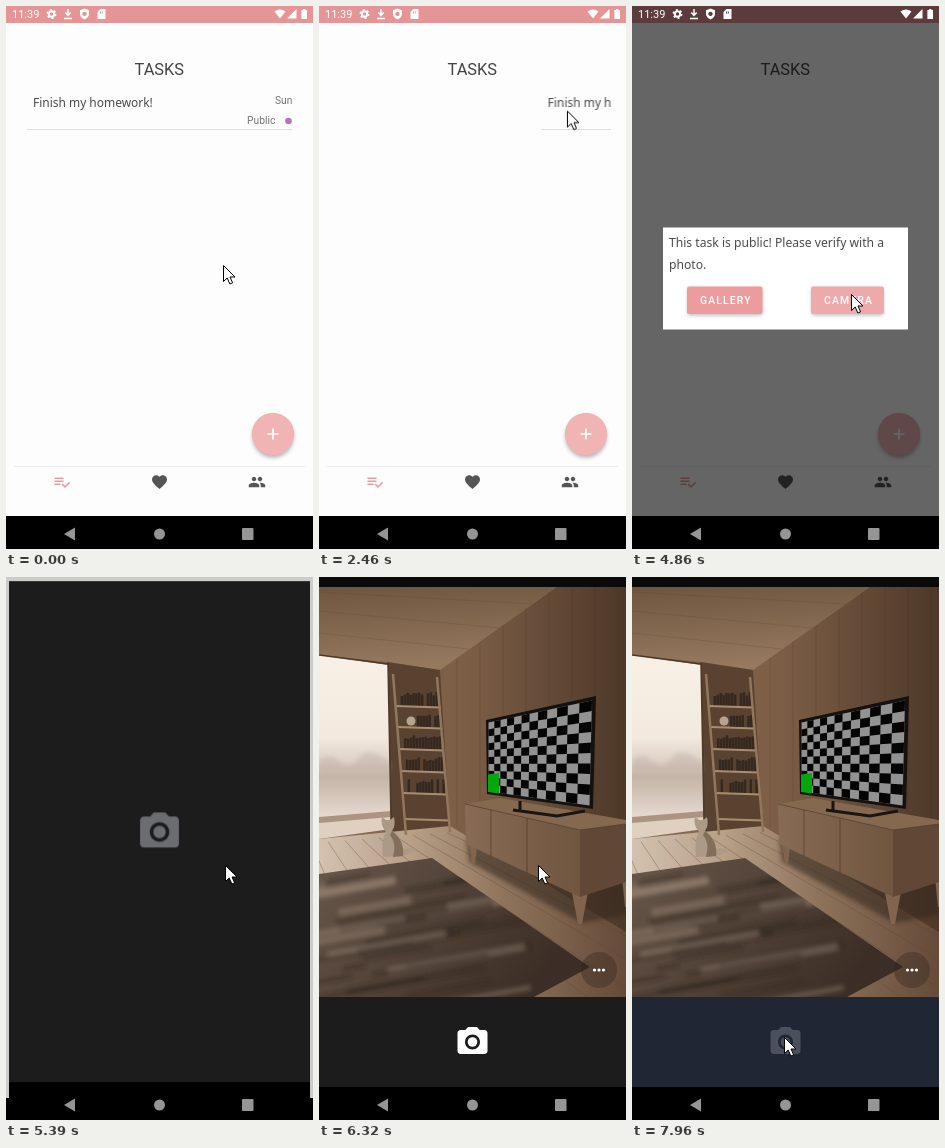
An HTML page that plays this animation: 307x543 px, repeating every 8 s.

```html
<!DOCTYPE html>
<html lang="en">
<head>
<meta charset="utf-8">
<title>Task verification</title>
<style>
html, body { margin: 0; width: 100%; height: 100%; overflow: hidden; background: #000; }
svg { display: block; width: 307px; height: 543px; }
text { font-family: Roboto, sans-serif; }
.note { font-family: "Noto Sans", sans-serif; fill: #4a4a4a; }
.btn { font-size: 10.4px; font-weight: 500; letter-spacing: 1.15px; fill: #fff; }
.anim { animation: 8s linear infinite; }

#cursor { animation-name: cursor; }
@keyframes cursor {
  0%, 5% { transform: translate(217px, 259px); }
  9% { transform: translate(92px, 150px); }
  12% { transform: translate(22px, 98px); }
  14.75%, 15.3% { transform: translate(70px, 90px); animation-timing-function: ease-in-out; }
  19.5% { transform: translate(177px, 82px); }
  21.5% { transform: translate(170px, 112px); }
  23.5%, 24.6% { transform: translate(140px, 98px); }
  25.375%, 26.4% { transform: translate(154px, 98px); }
  30% { transform: translate(255px, 104px); animation-timing-function: ease-in-out; }
  34.2%, 46.4% { transform: translate(149px, 113px); }
  49.75%, 51.2% { transform: translate(212px, 263px); }
  53.875%, 86.6% { transform: translate(219px, 288px); animation-timing-function: ease-in-out; }
  95%, 100% { transform: translate(152px, 460px); }
}
#row { animation-name: row; }
@keyframes row {
  0%, 24.8% { transform: none; }
  25.375%, 26.4% { transform: translateX(11px); }
  30% { transform: translateX(112px); }
  31.6%, 100% { transform: translateX(300px); }
}
#dim { animation-name: dim; }
@keyframes dim { 0%, 31.2% { opacity: 0; } 34.2%, 100% { opacity: .6; } }
#dialog { animation-name: dialog; transform-origin: 153.5px 272.5px; }
@keyframes dialog {
  0%, 31.4% { opacity: 0; transform: scale(.92); }
  34.2%, 100% { opacity: 1; transform: none; }
}
#press { animation-name: press; }
@keyframes press { 0%, 57.5% { opacity: 0; } 60.6%, 100% { opacity: .15; } }
#status { animation-name: status; }
@keyframes status { 0%, 62.99% { opacity: 1; } 63%, 100% { opacity: 0; } }
#backdrop { animation-name: backdrop; }
@keyframes backdrop { 0%, 64.2% { opacity: 0; } 64.875%, 100% { opacity: 1; } }
#camera { animation-name: camera; transform-origin: 153.5px 235px; }
@keyframes camera {
  0%, 64.5% { opacity: 0; transform: scale(.88); }
  65.9% { opacity: 1; transform: scale(.94); }
  67.375% { opacity: 1; transform: scale(.98, .982); }
  68.125%, 100% { opacity: 1; transform: none; }
}
#splash { animation-name: splash; }
@keyframes splash { 0%, 76% { opacity: 1; } 77.5%, 100% { opacity: 0; } }
#preview { animation-name: preview; }
@keyframes preview { 0%, 76% { opacity: 0; } 78%, 100% { opacity: 1; } }
#panel { animation-name: panel; }
@keyframes panel { 0%, 95.6% { fill: #1c1c1c; } 98.5%, 100% { fill: #1f2734; } }
#shutter { animation-name: shutter; }
@keyframes shutter { 0%, 95.6% { fill: #fff; } 98%, 100% { fill: #4a515d; } }
</style>
</head>
<body>
<svg viewBox="0 0 307 543">
  <defs>
    <clipPath id="listClip"><rect x="15" y="78" width="277" height="50"/></clipPath>
    <clipPath id="rugClip"><path d="M0 297L113 281 271 390 215 420H0Z"/></clipPath>
    <clipPath id="viewClip"><rect y="10" width="307" height="410"/></clipPath>
    <filter id="soft" x="-30%" y="-30%" width="160%" height="170%"><feGaussianBlur stdDeviation="2"/></filter>
    <linearGradient id="sky" x2="0" y2="1">
      <stop stop-color="#f8f0e6"/><stop offset=".48" stop-color="#f3e9df"/>
      <stop offset=".62" stop-color="#ddcfc4"/><stop offset=".7" stop-color="#c5b4a8"/>
      <stop offset=".78" stop-color="#d0c0b4"/><stop offset="1" stop-color="#efe4da"/>
    </linearGradient>
    <linearGradient id="wall"><stop stop-color="#8c6e55"/><stop offset=".5" stop-color="#7b5d45"/><stop offset="1" stop-color="#4d3829"/></linearGradient>
    <linearGradient id="ceiling" x2=".2" y2="1"><stop stop-color="#6f553f"/><stop offset="1" stop-color="#967a60"/></linearGradient>
    <linearGradient id="floor"><stop stop-color="#d3c2b0"/><stop offset=".3" stop-color="#b79f88"/><stop offset=".6" stop-color="#8f745c"/><stop offset="1" stop-color="#654b38"/></linearGradient>
    <linearGradient id="rug" x2="1" y2=".4"><stop stop-color="#68574a"/><stop offset="1" stop-color="#3c2e26"/></linearGradient>
    <linearGradient id="front"><stop stop-color="#886b54"/><stop offset="1" stop-color="#70553f"/></linearGradient>
    <g id="cam">
      <path fill-rule="evenodd" d="M9 2L7.17 4H4c-1.1 0-2 .9-2 2v12c0 1.1.9 2 2 2h16c1.1 0 2-.9 2-2V6c0-1.1-.9-2-2-2h-3.17L15 2H9zm3 15c-2.76 0-5-2.24-5-5s2.24-5 5-5 5 2.24 5 5-2.24 5-5 5z"/>
      <circle cx="12" cy="12" r="3.2"/>
    </g>
  </defs>

  <rect width="307" height="510" fill="#fdfdfd"/>
  <rect width="307" height="17" fill="#e69596"/>

  <text x="128.5" y="69" font-size="16.4" fill="#444">TASKS</text>
  <g clip-path="url(#listClip)">
    <g id="row" class="anim">
      <text class="note" x="27" y="101" font-size="11.96">Finish my homework!</text>
      <g font-size="10.3" fill="#777">
        <text x="269" y="98">Sun</text>
        <text x="241" y="118">Public</text>
      </g>
      <circle cx="282.5" cy="115" r="3.3" fill="#b673bd"/>
      <path d="M21 123.5H286" stroke="#ddd"/>
    </g>
  </g>
  <circle cx="267" cy="431" r="20.5" fill="#000" opacity=".3" filter="url(#soft)"/>
  <circle cx="267" cy="428" r="21.2" fill="#f0b4b4"/>
  <path d="M261.5 428h11M267 422.5v11" stroke="#fff" stroke-width="1.7"/>
  <path d="M8 460.5H299" stroke="#eee"/>
  <g fill="#555">
    <path fill="#ef9a9a" transform="translate(47 467) scale(.75)" d="M14 10H2v2h12v-2zm0-4H2v2h12V6zM2 16h8v-2H2v2zm19.5-4.5L23 13l-6.99 7-4.51-4.5L13 14l3.01 3 5.49-5.5z"/>
    <path transform="translate(144.5 467) scale(.75)" d="M12 21.35l-1.45-1.32C5.4 15.36 2 12.28 2 8.5 2 5.42 4.42 3 7.5 3c1.74 0 3.41.81 4.5 2.09C13.09 3.81 14.76 3 16.5 3 19.58 3 22 5.42 22 8.5c0 3.78-3.4 6.86-8.55 11.54L12 21.35z"/>
    <path transform="translate(242 467) scale(.75)" d="M16 11c1.66 0 2.99-1.34 2.99-3S17.66 5 16 5s-3 1.34-3 3 1.34 3 3 3zm-8 0c1.66 0 2.99-1.34 2.99-3S9.66 5 8 5 5 6.34 5 8s1.34 3 3 3zm0 2c-2.33 0-7 1.17-7 3.5V19h14v-2.5c0-2.33-4.67-3.5-7-3.5zm8 0c-.29 0-.62.02-.97.05 1.16.84 1.97 1.97 1.97 3.45V19h6v-2.5c0-2.33-4.67-3.5-7-3.5z"/>
  </g>
  <rect y="510" width="307" height="33"/>
  <rect id="dim" class="anim" width="307" height="510"/>

  <g id="status" class="anim" fill="#fff">
    <text x="6" y="12" font-size="11">11:39</text>
    <g fill="none" stroke="#fff">
      <circle cx="45.5" cy="8" r="2.7" stroke-width="2"/>
      <circle cx="45.5" cy="8" r="4.2" stroke-width="1.5" stroke-dasharray="2 2.4"/>
      <path d="M62 3v6M59.3 6.5L62 9.3 64.7 6.5M58 12.5h8" stroke-width="1.5"/>
    </g>
    <path fill-rule="evenodd" d="M78.5 2.5l4.5 1.7v3.5c0 2.8-2 4.8-4.5 5.8-2.5-1-4.5-3-4.5-5.8V4.2ZM78.5 5.7a2.2 2.2 0 1 0 .01 0Z"/>
    <path fill-rule="evenodd" d="M94.5 3H99.5V13H91.5V6ZM94 5.5v2h1v-2zm1.8 0v2h1v-2z"/>
    <path d="M268.5 5.5Q274 1.5 279.5 5.5L274 12.5Z"/>
    <path d="M281 12.5L290.5 3V12.5Z"/>
    <path d="M297 3h2.4v1H301v9h-5.6V4H297Z"/>
  </g>

  <g id="dialog" class="anim">
    <rect x="31" y="221.5" width="245" height="102" fill="#fff"/>
    <g font-size="12.13">
      <text class="note" x="37" y="241">This task is public! Please verify with a</text>
      <text class="note" x="37" y="262.5">photo.</text>
    </g>
    <g fill="#000" opacity=".3" filter="url(#soft)">
      <rect x="56" y="283" width="74" height="26"/><rect x="180" y="283" width="71" height="26"/>
    </g>
    <g fill="#ec9c9d">
      <rect x="55" y="280.5" width="75.5" height="27.5" rx="2"/>
      <rect x="179" y="280.5" width="73" height="27.5" rx="2"/>
    </g>
    <rect id="press" class="anim" x="179" y="280.5" width="73" height="27.5" rx="2" fill="#fff"/>
    <text class="btn" x="68" y="298">GALLERY</text>
    <text class="btn" x="192" y="298">CAMERA</text>
  </g>

  <rect id="backdrop" class="anim" width="307" height="521" fill="#cbcdca"/>
  <g id="camera" class="anim">
    <rect width="307" height="543"/>
    <rect width="307" height="510" fill="#1c1c1c"/>
    <g id="splash" class="anim" fill="#6c6d70">
      <use href="#cam" transform="translate(129.7 231.5) scale(1.985)"/>
    </g>
    <g id="preview" class="anim">
      <rect width="307" height="10" fill="#0a0a0a"/>
      <g clip-path="url(#viewClip)">
        <rect y="10" width="307" height="410" fill="url(#wall)"/>
        <path id="planks" fill="none" stroke="#3d2b1f" stroke-opacity=".22" stroke-width=".8"/>
        <path d="M0 10H238L121 93 70 85 0 77Z" fill="url(#ceiling)"/>
        <path d="M0 34L180 51M0 56L150 72M0 15L215 27" stroke="#5b4532" stroke-opacity=".25"/>
        <path d="M68 85L121 93 131 252 68 264Z" fill="#59422f"/>
        <path d="M0 262L131 249 307 355V420H0Z" fill="url(#floor)"/>
        <path id="boards" stroke="#5d4735" stroke-opacity=".35"/>
        <path d="M0 78L69 88 72 242 0 251Z" fill="url(#sky)"/>
        <path d="M0 184Q10 174 20 184T40 181 71 186V194H0Z" fill="#b9a59b" opacity=".35" filter="url(#soft)"/>
        <path d="M0 240L72 234V243L0 251Z" fill="#ab9482"/>
        <path d="M0 246L72 240V252L0 262Z" fill="#dfd0c0"/>
        <path d="M0 78L69 87 72 243" fill="none" stroke="#4d3929" stroke-width="1.5"/>

        <path id="books" fill="#35281f"/>
        <path id="shelves" stroke="#a98d71" stroke-width="2"/>
        <path d="M74 97L87 258M118 100L131 255" fill="none" stroke="#93775d" stroke-width="2.5"/>
        <circle cx="92" cy="144" r="4.5" fill="#b7a48f"/>

        <path d="M0 297L113 281 271 390 215 420H0Z" fill="url(#rug)"/>
        <g clip-path="url(#rugClip)"><g id="streaks" filter="url(#soft)"></g></g>

        <path d="M64 280Q62 262 67 255Q61 248 63 240L67 243H71L75 240Q77 249 73 254Q84 261 84 272L95 271 97 274 84 279Z" fill="#ac9a86"/>
        <path d="M71 258Q78 266 74 280L84 279Q86 264 73 254Z" fill="#826e5b"/>

        <path d="M147 262L253 314 307 300V338L263 346 150 285Z" fill="#33251b" opacity=".55" filter="url(#soft)"/>
        <path d="M150 267L153 287H156L158 270ZM253 316L259 347H263L269 315ZM303 300L306 330H307V300Z" fill="#80644d"/>
        <path d="M146 227L181 221 307 243V252L261 255Z" fill="#84684f"/>
        <path d="M146 227L261 253V320L147 267Z" fill="url(#front)"/>
        <path d="M261 253L307 247V305L261 320Z" fill="#614836"/>
        <path d="M172 233V279M208 241V296M146 227L261 253 307 247" fill="none" stroke="#493526" stroke-width=".8" stroke-opacity=".7"/>
        <path d="M201 224V234M194 233L238 239 266 234" fill="none" stroke="#1a1512" stroke-width="3"/>
        <path d="M167 143L277 119 274 232 168 217Z" fill="#15110f"/>
        <path d="M169.5 145.5L273 123.5 270.5 228.5 169.5 214.5Z" fill="#929292"/>
        <path id="checks" fill="#050505"/>
        <path d="M169 197.5L180 196V216.5L169 215Z" fill="#00a80c"/>

        <circle cx="280" cy="393" r="18" fill="#2c211a" opacity=".35"/>
        <g fill="#fff"><circle cx="275.5" cy="393" r="1.6"/><circle cx="280" cy="393" r="1.6"/><circle cx="284.5" cy="393" r="1.6"/></g>
      </g>
      <rect id="panel" class="anim" y="420" width="307" height="90"/>
      <g id="shutter" class="anim"><use href="#cam" transform="translate(135.5 447) scale(1.5)"/></g>
    </g>
  </g>

  <g fill="#959595">
    <path d="M58 528L69 521.5V534.5Z"/>
    <circle cx="153.5" cy="528" r="5.5"/>
    <rect x="236" y="522" width="11.5" height="12" rx="1"/>
  </g>
  <g id="cursor" class="anim">
    <path d="M.5.5V16.5L4.2 13 6.9 19 9.6 17.8 7 12H12Z" fill="#fff" stroke="#000"/>
  </g>
</svg>
<script>
const $ = id => document.getElementById(id);
const setPath = (id, parts) => $(id).setAttribute('d', parts.join(''));
const range = n => Array.from({ length: n }, (_, i) => i);
const mix = (a, b, t) => a + (b - a) * t;
let seed = 7;
const rand = () => (seed = seed * 16807 % 2147483647) / 2147483647;

// Checkerboard in perspective: depth is the ratio of the screen's side heights
const COLS = 12, ROWS = 10, DEPTH = 1.52;
function screenPoint(col, row) {
  const u = col / COLS, v = row / ROWS;
  const x = u / mix(DEPTH, 1, u);
  return [mix(169.5, mix(273, 270.5, v), x), mix(mix(145.5, 123.5, x), mix(214.5, 228.5, x), v)];
}
const cells = range(COLS * ROWS)
  .map(i => [i % COLS, Math.floor(i / COLS)])
  .filter(([c, r]) => (c + r) % 2);
setPath('checks', cells.map(([c, r]) => 'M' + [
  screenPoint(c, r), screenPoint(c + 1, r), screenPoint(c + 1, r + 1), screenPoint(c, r + 1)
].join('L') + 'Z'));

// Shelves and their books
const shelfY = [130, 151, 173, 195, 217, 243];
const shelfX = y => 74 + (y - 97) * .08;
setPath('shelves', shelfY.map(y => `M${shelfX(y)} ${y - 1}l45 1.5`));
setPath('books', shelfY.slice(0, 5).flatMap((y, s) => range(13).map(i => {
  const x = shelfX(y) + 5 + i * 2.9, h = 11 + rand() * 4;
  return (s === 1 && i < 5) || rand() < .1 ? '' : `M${x} ${y}v${-h}h2.5v${h}z`;
})));

// Wood seams
setPath('planks', range(8).map(i => `M${138 + i * 23} 10V${250 + i * 8}`));
setPath('boards', range(9).map(i => `M${i * 17 - 8} ${266 - i * 1.3}L${i * 52 + 60} 420`));

// Rug streaks, lighter near the window
$('streaks').innerHTML = range(30).map(i => {
  const x = rand() * 190 - 60, y = 306 + i * 4.2, w = 50 + rand() * 90;
  const tone = i > 2 && i < 9 || rand() < .3 ? '#a08d7b' : '#2f241d';
  return `<path d="M${x} ${y}l${w} ${-w * .18}" stroke="${tone}" stroke-width="${4 + rand() * 5}" stroke-opacity=".4"/>`;
}).join('');
</script>
</body>
</html>
```
